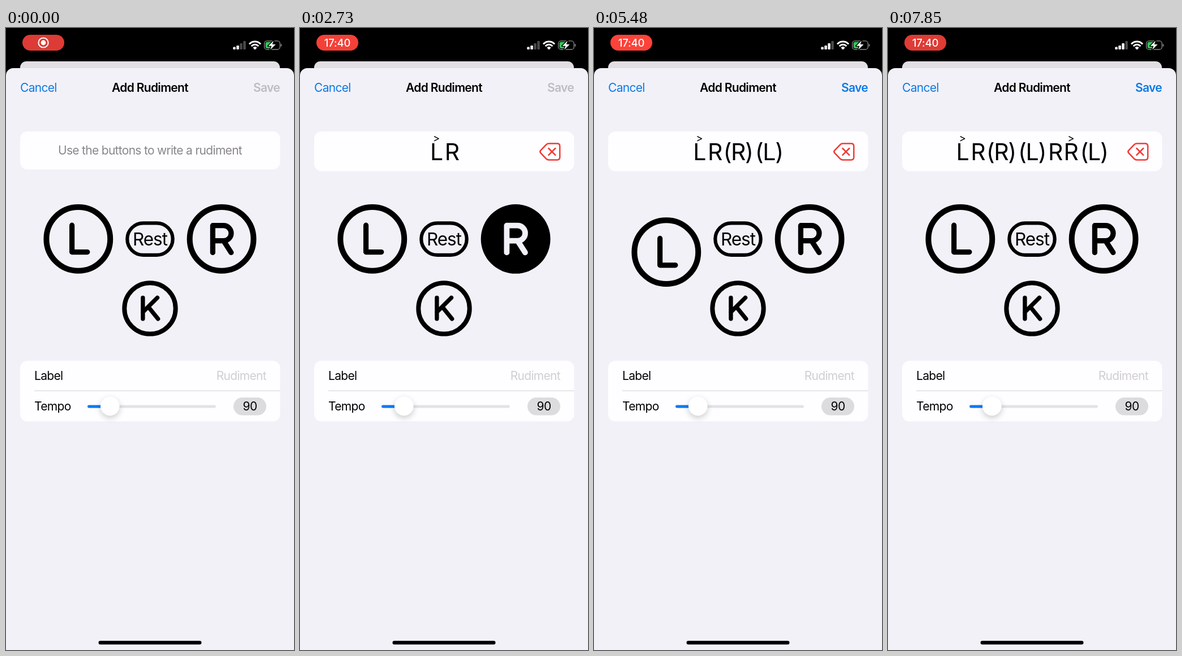
Recreate the animation shown at these times as an HTML page with a canvas. Size 509x1101 px, loop 7910 ms.

```html
<!DOCTYPE html>
<html lang="en">
<head>
<meta charset="utf-8">
<title>Add Rudiment</title>
<style>
html, body { margin: 0; width: 100%; height: 100%; overflow: hidden; background: #000; }
canvas { display: block; width: 509px; height: 1101px; }
</style>
</head>
<body>
<canvas id="stage"></canvas>
<script>
const W = 509, H = 1101, LOOP = 7910, MID = 254.5;
const FONT = 'Inter, "Noto Sans", sans-serif';
const INK = '#000', SHEET = '#f2f1f8', CARD = '#fefdff', BLUE = '#0a7ae6', RED = '#f03a35';
const REACH = 49, RETURN = 350, TAP_HOLD = 80;

const canvas = document.getElementById('stage');
const ctx = canvas.getContext('2d');
const dpr = window.devicePixelRatio || 1;
canvas.width = W * dpr;
canvas.height = H * dpr;

// dir: -1 drags up for an accent, 1 drags down for a ghost note, 0 taps
const gestures = [
  { key: 'L', dir: -1, down: 480, drag: 740, at: 1010 },
  { key: 'R', dir: 0, down: 2630, at: 2700 },
  { key: 'R', dir: 1, down: 3210, drag: 3450, at: 3745 },
  { key: 'L', dir: 1, down: 4500, drag: 4960, at: 5300 },
  { key: 'R', dir: 0, down: 6030, at: 6100 },
  { key: 'R', dir: -1, down: 6540, drag: 6640, at: 6860 },
  { key: 'L', dir: 1, down: 7130, drag: 7220, at: 7470 }
];

const clamp = v => Math.max(0, Math.min(1, v));
const ease = v => { v = clamp(v); return v * v * (3 - 2 * v); };

function box(x, y, w, h, r, color) {
  ctx.beginPath();
  ctx.roundRect(x, y, w, h, r);
  ctx.fillStyle = color;
  ctx.fill();
}

function disc(x, y, r, color) {
  ctx.beginPath();
  ctx.arc(x, y, r, 0, Math.PI * 2);
  ctx.fillStyle = color;
  ctx.fill();
}

function stroke(color, width) {
  ctx.strokeStyle = color;
  ctx.lineWidth = width;
  ctx.lineCap = ctx.lineJoin = 'round';
  ctx.stroke();
}

function line(points, color, width) {
  ctx.beginPath();
  points.forEach(([x, y]) => ctx.lineTo(x, y));
  stroke(color, width);
}

function text(str, x, y, size, { align = 'left', color = INK, weight = 400, track = -0.033 } = {}) {
  ctx.font = `${weight} ${size}px ${FONT}`;
  ctx.letterSpacing = `${track * size}px`;
  ctx.textAlign = align;
  ctx.fillStyle = color;
  ctx.fillText(str, x, y);
}

function drawPill(t) {
  const glow = clamp(0.5 + 0.8 * Math.cos(2 * Math.PI * (t / 2000 - 0.58)));
  box(29, 12, 74, 28, 14, `rgb(${220 + 35 * glow}, ${60 + 8 * glow}, ${53 + 5 * glow})`);
  if (t < 2050) {
    ctx.beginPath();
    ctx.arc(66, 26, 8.6, 0, Math.PI * 2);
    stroke('#fff', 2);
    disc(66, 26, 4.4, '#fff');
  } else {
    text('17:40', 66, 32.6, 18.5, { align: 'center', color: '#fff', weight: 500, track: -0.01 });
  }
}

function drawStatus(t) {
  drawPill(t);
  const lit = t < 3100 ? 2 : 3;
  [4.5, 7, 11, 15].forEach((h, i) =>
    box(401.3 + i * 6, 38 - h, 4.5, h, 1.2, i < lit ? '#fff' : '#4a4a4a'));

  // wifi fan
  ctx.save();
  ctx.beginPath();
  ctx.moveTo(440, 38.5);
  ctx.lineTo(426, 24.5);
  ctx.lineTo(426, 15);
  ctx.lineTo(454, 15);
  ctx.lineTo(454, 24.5);
  ctx.closePath();
  ctx.clip();
  for (const r of [13.4, 8.2]) {
    ctx.beginPath();
    ctx.arc(440, 37.5, r, Math.PI, Math.PI * 2);
    stroke('#fff', 3);
  }
  disc(440, 37.5, 4.4, '#fff');
  ctx.restore();

  // battery
  ctx.beginPath();
  ctx.roundRect(456.6, 22.8, 27.6, 15.2, 4.6);
  stroke('#8a8a8a', 1.3);
  box(458.6, 24.8, 12.5, 11.2, [3, 0, 0, 3], '#35c759');
  box(485.6, 28, 1.8, 5, [0, 2, 2, 0], '#8a8a8a');
  ctx.beginPath();
  [[473, 22.5], [463.5, 31.8], [469.4, 31.8], [467, 38.5], [476.6, 29], [470.6, 29]]
    .forEach(([x, y]) => ctx.lineTo(x, y));
  ctx.closePath();
  stroke('#000', 3);
  ctx.fillStyle = '#fff';
  ctx.fill();
}

function drawField(notes) {
  box(25, 183, 459.5, notes.length ? 70.5 : 67.5, 13, CARD);
  if (!notes.length) {
    text('Use the buttons to write a rudiment', MID, 224, 21, { align: 'center', color: '#88868b' });
    return;
  }
  const cell = n => n.dir === 1 ? 54.7 : 27.4;
  let x = MID - notes.reduce((sum, n) => sum + cell(n), 0) / 2;
  for (const n of notes) {
    const mid = x + cell(n) / 2;
    text(n.dir === 1 ? `(${n.key})` : n.key, mid, 234, 41, { align: 'center' });
    if (n.dir === -1) text('>', mid, 201.5, 18.5, { align: 'center' });
    x += cell(n);
  }
  // delete key
  ctx.beginPath();
  ctx.moveTo(425.4, 216.6);
  ctx.lineTo(435.2, 206.4);
  ctx.quadraticCurveTo(437, 204.6, 440, 204.6);
  ctx.lineTo(454.6, 204.6);
  ctx.quadraticCurveTo(459.2, 204.6, 459.2, 209.2);
  ctx.lineTo(459.2, 228.8);
  ctx.quadraticCurveTo(459.2, 233.4, 454.6, 233.4);
  ctx.lineTo(440, 233.4);
  ctx.quadraticCurveTo(437, 233.4, 435.2, 231.6);
  ctx.lineTo(425.4, 221.4);
  ctx.quadraticCurveTo(423.2, 219, 425.4, 216.6);
  stroke(RED, 2.5);
  line([[439.4, 213], [451.2, 224.8]], RED, 2.5);
  line([[451.2, 213], [439.4, 224.8]], RED, 2.5);
}

// Letter strokes around the centre of a round button
const glyphs = {
  L() {
    ctx.moveTo(-11.2, -24.2);
    ctx.lineTo(-11.2, 23.2);
    ctx.lineTo(16, 23.2);
  },
  R() {
    ctx.moveTo(-15.7, 24);
    ctx.lineTo(-15.7, -23.7);
    ctx.lineTo(3.4, -23.7);
    ctx.arc(3.4, -10.2, 13.5, -Math.PI / 2, Math.PI / 2);
    ctx.lineTo(-15.7, 3.3);
    ctx.moveTo(3.5, 3.3);
    ctx.lineTo(16.8, 24);
  },
  K() {
    ctx.moveTo(-12.6, -19);
    ctx.lineTo(-12.6, 18.4);
    ctx.moveTo(13, -19);
    ctx.lineTo(-12.6, 6.4);
    ctx.moveTo(-3, -2.8);
    ctx.lineTo(14.2, 18.4);
  }
};

function roundKey(key, x, y, r, ring, pen, filled) {
  ctx.save();
  ctx.translate(x, y);
  if (filled) {
    disc(0, 0, r, INK);
  } else {
    ctx.beginPath();
    ctx.arc(0, 0, r - ring / 2, 0, Math.PI * 2);
    stroke(INK, ring);
  }
  ctx.beginPath();
  glyphs[key]();
  stroke(filled ? SHEET : INK, pen + (filled ? 0.6 : 0));
  ctx.restore();
}

function drawHints(x) {
  line([[x - 8, 284.4], [x, 276.2], [x + 8, 284.4]], INK, 2.2);
  text('Accented note', x, 301.5, 16.2, { align: 'center', track: -0.025 });
  text('Ghost note', x, 456.5, 16.2, { align: 'center', track: -0.025 });
  line([[x - 8, 463.4], [x, 471.6], [x + 8, 463.4]], INK, 2.2);
}

function keyState(key, t) {
  const state = { shift: 0, filled: false, hints: false };
  for (const g of gestures) {
    if (g.key !== key || t < g.down) continue;
    const held = t < g.at + (g.dir ? 0 : TAP_HOLD);
    if (held) {
      state.filled = true;
      state.hints = g.dir !== 0;
    }
    if (g.dir) {
      const travel = ease((t - g.drag) / 180) * (1 - ease((t - g.at) / RETURN));
      state.shift += g.dir * REACH * travel;
    }
  }
  return state;
}

function drawKeys(t) {
  ctx.beginPath();
  ctx.roundRect(214.3, 345.3, 80.4, 56.6, 28.3);
  stroke(INK, 6.2);
  text('Rest', MID, 384.8, 31.5, { align: 'center' });
  roundKey('K', MID, 496.4, 49.2, 8, 7.4, false);
  for (const [key, x] of [['L', 127.8], ['R', 381.1]]) {
    const s = keyState(key, t);
    if (s.hints) drawHints(x);
    roundKey(key, x, 373.4 + s.shift, 61.4, 10, 9.2, s.filled);
  }
}

function drawSettings() {
  box(25, 589, 459.5, 107.5, 13, CARD);
  text('Label', 50, 623, 21);
  text('Rudiment', 460, 623, 21, { align: 'right', color: '#d0ced3' });
  box(50, 641.5, 434.5, 1.2, 0, '#d9d7db');
  text('Tempo', 50, 677, 21);
  box(144, 667.6, 227, 4.8, 2.4, '#e3e2e6');
  box(144, 667.6, 40, 4.8, 2.4, '#087cf2');
  ctx.save();
  ctx.shadowColor = 'rgba(0, 0, 0, 0.2)';
  ctx.shadowBlur = 11 * dpr;
  ctx.shadowOffsetY = 4 * dpr;
  disc(183.8, 669.3, 16.9, '#fff');
  ctx.restore();
  box(402, 654, 58, 31.6, 15.8, '#dcdbde');
  text('90', 431, 677, 21, { align: 'center' });
}

function draw(t) {
  const notes = gestures.filter(g => t >= g.at);
  ctx.setTransform(dpr, 0, 0, dpr, 0, 0);
  ctx.fillStyle = '#000';
  ctx.fillRect(0, 0, W, H);
  drawStatus(t);
  box(25, 59, 459, 40, 11, '#e3dee3');
  box(0, 71, W, H - 71, [13, 13, 0, 0], SHEET);
  text('Cancel', 25, 113, 21, { color: BLUE });
  text('Add Rudiment', MID, 113, 21, { align: 'center', weight: 600 });
  text('Save', 484, 113, 21, { align: 'right', weight: 600, color: notes.length > 2 ? BLUE : '#bdbcc2' });
  drawField(notes);
  drawKeys(t);
  drawSettings();
  box(163.5, 1084.8, 182, 6.4, 3.2, '#000');
}

const start = performance.now();
function tick() {
  draw((performance.now() - start) % LOOP);
  requestAnimationFrame(tick);
}
tick();
</script>
</body>
</html>
```
